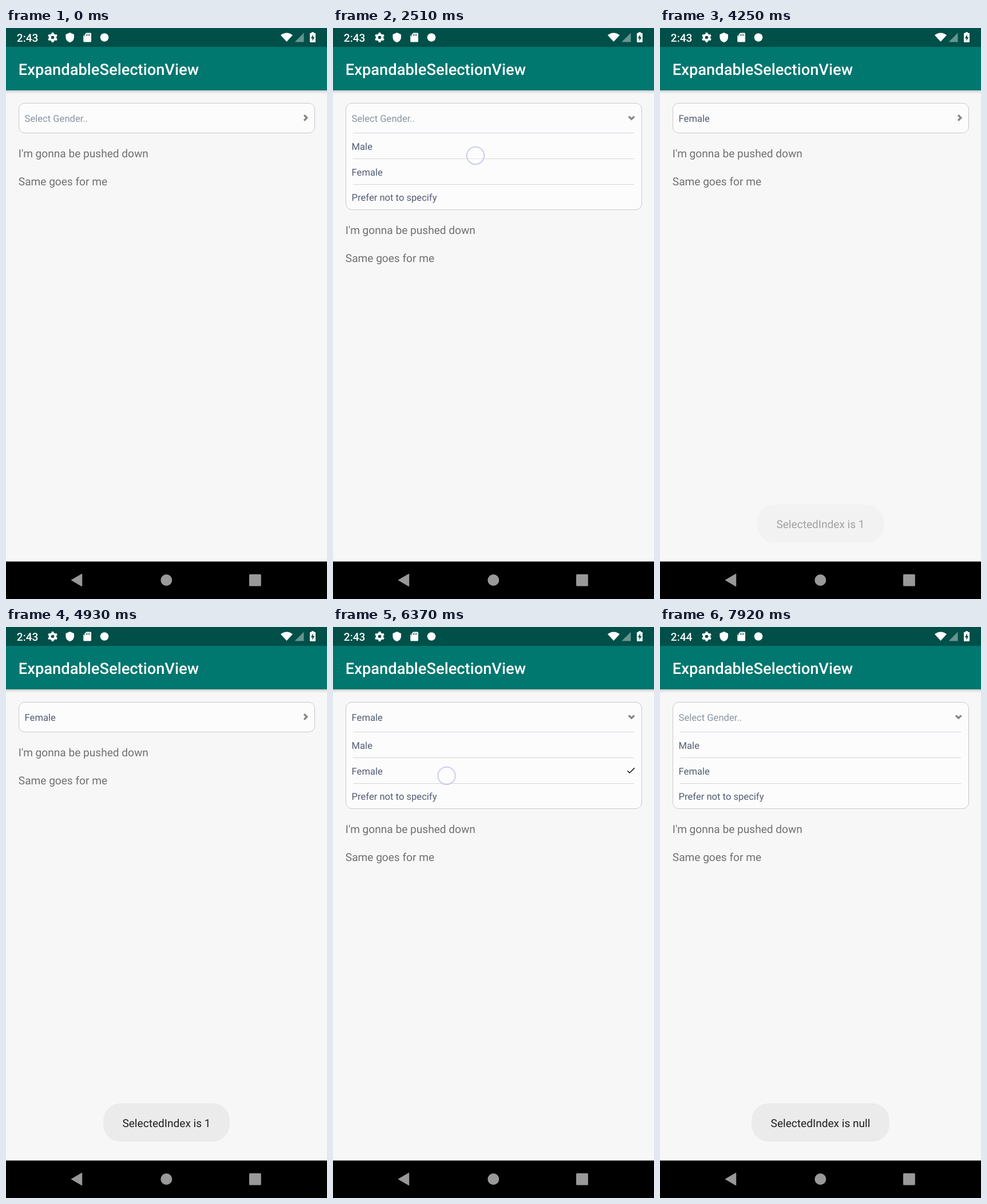
Animation, 561 px wide and 998 px high, one loop 8000 ms. Source, as an HTML page:

```html
<!DOCTYPE html>
<html lang="en">
<head>
<meta charset="utf-8">
<title>Expandable selection</title>
<style>
  html, body { margin: 0; width: 100%; height: 100%; overflow: hidden; background: #f7f7f8; }
  svg { position: absolute; left: 0; top: 0; display: block; }
  text { font-family: Roboto, "Noto Sans", sans-serif; text-rendering: geometricPrecision; }

  .clock { font-size: 19.1px; font-weight: 500; fill: #fff; }
  .title { font-size: 27.3px; font-weight: 500; fill: #fff; }
  .note { font-size: 19.1px; fill: #707070; }
  .item { font-size: 16.6px; fill: #525d72; }
  .hint { font-size: 16.6px; fill: #8995a0; }
  .toast text { font-size: 19.1px; fill: #1e1e1e; text-anchor: middle; }
  .toast rect { fill: #ebebec; }
  .rule { stroke: #d6d6db; stroke-width: 1; }
  .chevron { fill: none; stroke: #86867f; stroke-width: 3.3; }

  .card {
    position: absolute; left: 22px; top: 131px; width: 518px; height: 53px;
    box-sizing: border-box; overflow: hidden;
    border: 1px solid #c9c9ca; border-radius: 11px; background: #fcfcfd;
  }

  .card, .push { animation: 8s ease-in-out infinite; }
  .card { animation-name: grow; }
  .push { animation-name: push; }
  @keyframes grow {
    0%, 16.25%, 52%, 65.44%, 85.875%, 93% { height: 53px; }
    20%, 48.25%, 69.19%, 82.125%, 96.75%, 100% { height: 187px; }
  }
  @keyframes push {
    0%, 16.25%, 52%, 65.44%, 85.875%, 93% { transform: translateY(0); }
    20%, 48.25%, 69.19%, 82.125%, 96.75%, 100% { transform: translateY(134px); }
  }

  /* hard switches */
  .closed, .opened, .empty, .chosen, .before, .after, .tap { animation: 8s step-end infinite; }
  .closed { animation-name: closed; }
  .opened { animation-name: opened; }
  .empty { animation-name: empty; }
  .chosen { animation-name: chosen; }
  .before { animation-name: before; }
  .after { animation-name: after; }
  .tap { animation-name: tap; }
  @keyframes closed {
    0%, 48.25%, 82.125% { opacity: 1; }
    16.25%, 65.44%, 93%, 100% { opacity: 0; }
  }
  @keyframes opened {
    0%, 48.25%, 82.125% { opacity: 0; }
    16.25%, 65.44%, 93%, 100% { opacity: 1; }
  }
  @keyframes empty { 0%, 80.875%, 100% { opacity: 1; } 47.125% { opacity: 0; } }
  @keyframes chosen { 0%, 80.875%, 100% { opacity: 0; } 47.125% { opacity: 1; } }
  @keyframes before { 0% { opacity: 1; } 85%, 100% { opacity: 0; } }
  @keyframes after { 0% { opacity: 0; } 85%, 100% { opacity: 1; } }
  @keyframes tap {
    0%, 14.5%, 33.5%, 46.8%, 65.2%, 81%, 92.3%, 100% { opacity: 0; }
    10.875% { opacity: 1; transform: translate(215px, 166px); }
    30.2% { opacity: 1; transform: translate(249px, 223px); }
    43.6% { opacity: 1; transform: translate(215px, 264px); }
    62.8% { opacity: 1; transform: translate(205px, 166px); }
    78.8% { opacity: 1; transform: translate(198.5px, 260px); }
    90% { opacity: 1; transform: translate(212.5px, 167px); }
  }

  .toast { opacity: 0; animation: 8s linear infinite; }
  .first { animation-name: first; }
  .second { animation-name: second; }
  @keyframes first {
    0%, 51.4%, 79.2%, 100% { opacity: 0; }
    55.8%, 74.8% { opacity: 1; }
  }
  @keyframes second { 0%, 85.5% { opacity: 0; } 90%, 100% { opacity: 1; } }
</style>
</head>
<body>
<svg width="561" height="998" viewBox="0 0 561 998">
  <defs>
    <linearGradient id="shade" x1="0" y1="0" x2="0" y2="1">
      <stop offset="0" stop-color="#000" stop-opacity=".16"/>
      <stop offset="1" stop-color="#000" stop-opacity="0"/>
    </linearGradient>
  </defs>
  <rect width="561" height="998" fill="#f7f7f8"/>
  <rect y="109" width="561" height="6" fill="url(#shade)"/>
  <rect width="561" height="109" fill="#00776f"/>
  <rect width="561" height="33" fill="#004f49"/>

  <text class="clock before" x="18.8" y="23.6">2:43</text>
  <text class="clock after" x="18.8" y="23.6">2:44</text>

  <g fill="none" stroke="#fff">
    <circle cx="81.5" cy="16.5" r="4.8" stroke-width="4"/>
    <circle cx="81.5" cy="16.5" r="7.2" stroke-width="2.8" pathLength="12" stroke-dasharray="1 1" stroke-dashoffset="-.5"/>
  </g>
  <g fill="#fff">
    <path d="M111.7 8 L119 11.2 V16 Q119 22.7 111.7 25.2 Q104.4 22.7 104.4 16 V11.2 Z"/>
    <path d="M140.3 8.5 H147.5 Q149 8.5 149 10 V23 Q149 24.5 147.5 24.5 H136.7 Q135.2 24.5 135.2 23 V13.6 Z"/>
    <circle cx="172" cy="16.5" r="7.3"/>
    <path d="M480 12.4 Q490.5 4.8 501 12.4 L490.5 24 Z"/>
    <path d="M520.5 8.5 V24.5 H504.5 Z" opacity=".4"/>
    <path d="M534 8.8 V7.3 H538 V8.8 H540 Q541 8.8 541 9.8 V24 Q541 25 540 25 H532 Q531 25 531 24 V9.8 Q531 8.8 532 8.8 Z"/>
  </g>
  <path d="M137 11.5 V14.5 M140.5 10.5 V13.7 M143.3 10.5 V13.7 M146.1 10.5 V13.7" stroke="#004f49" stroke-width="1.2"/>
  <path d="M536.8 11.5 L532.8 18 H535.4 V22.7 L539.3 16 H536.8 Z" fill="#004f49"/>

  <text class="title" x="21.8" y="81.7">ExpandableSelectionView</text>

  <g class="push">
    <text class="note" x="21.8" y="226.2">I'm gonna be pushed down</text>
    <text class="note" x="21.8" y="274.6">Same goes for me</text>
  </g>

  <rect y="932.5" width="561" height="65.5" fill="#000"/>
  <g fill="#999">
    <path d="M114.5 965 L132.5 954.6 V975.4 Z" stroke="#999" stroke-width="1.4" stroke-linejoin="round"/>
    <circle cx="280.3" cy="965" r="10"/>
    <rect x="425" y="954.7" width="20.8" height="20.8" rx="1.6"/>
  </g>
</svg>

<div class="card">
  <svg width="516" height="186" viewBox="23 132 516 186">
    <text class="hint empty" x="32.6" y="164">Select Gender..</text>
    <text class="item chosen" x="32.6" y="164">Female</text>
    <path class="chevron closed" d="M521 152.3 L525.8 157 L521 161.7"/>
    <path class="chevron opened" d="M516.8 154.6 L521.7 159.3 L526.6 154.6"/>
    <path class="rule" d="M35 183.5 H526 M35 228.5 H526 M35 273.5 H526"/>
    <text class="item" x="32.6" y="212.9">Male</text>
    <text class="item" x="32.6" y="257.6">Female</text>
    <text class="item" x="32.6" y="302.2">Prefer not to specify</text>
    <path class="chosen" d="M514.6 251.3 L518.3 255 L527 246.4" fill="none" stroke="#111" stroke-width="1.5"/>
  </svg>
</div>

<svg width="561" height="998" viewBox="0 0 561 998">
  <g class="toast first">
    <rect x="170" y="832.5" width="221" height="67" rx="30"/>
    <text x="280.5" y="873.8">SelectedIndex is 1</text>
  </g>
  <g class="toast second">
    <rect x="160" y="832.5" width="241" height="67" rx="30"/>
    <text x="280.5" y="873.8">SelectedIndex is null</text>
  </g>
  <circle class="tap" r="15.2" fill="#fff" fill-opacity=".35" stroke="#c9cdec" stroke-width="2"/>
</svg>
</body>
</html>
```
